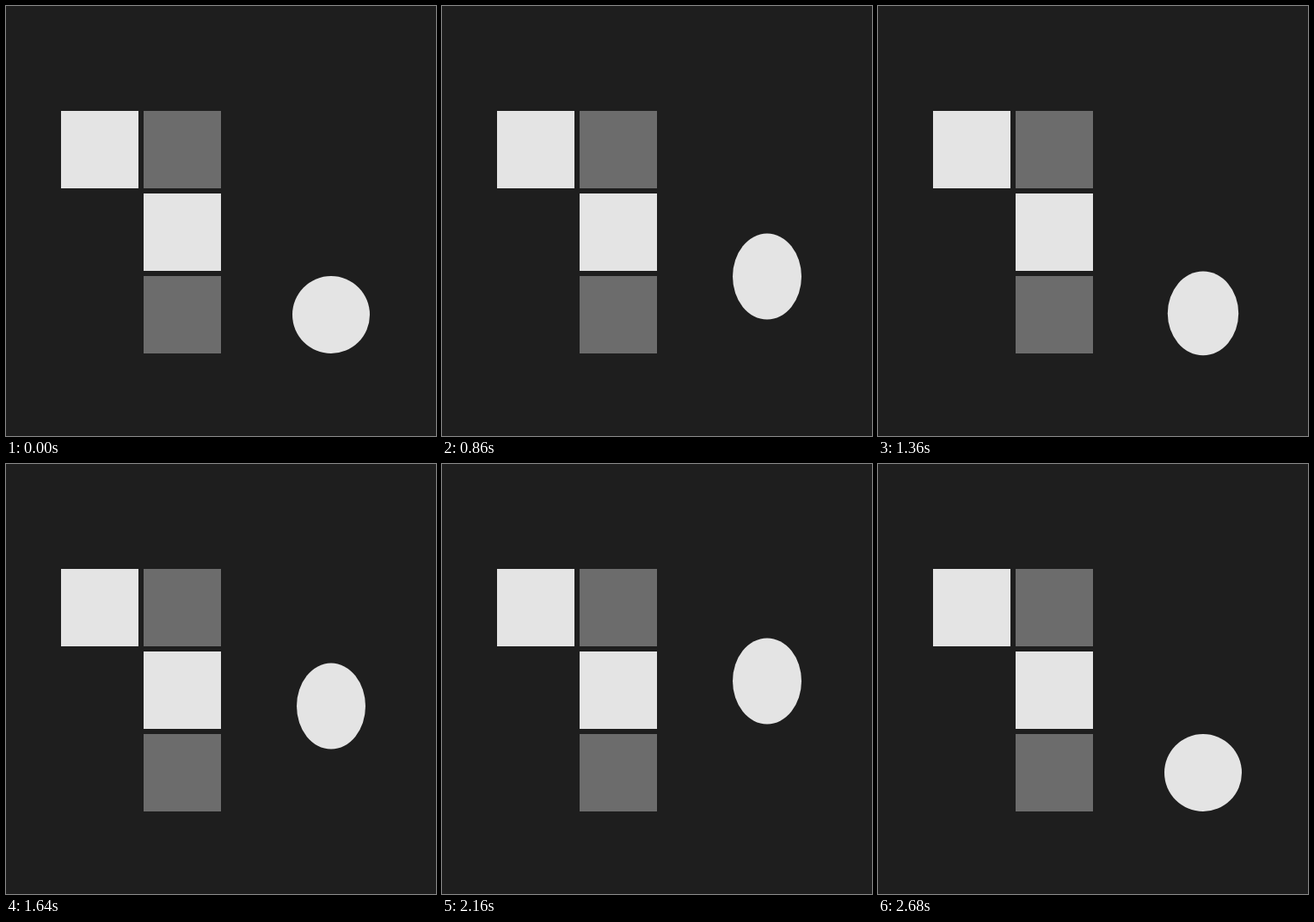
Animation of 500 by 500 pixels, one loop 3.26 s. Source, as an HTML page:

```html
<!DOCTYPE html>
<html lang="en">
<head>
<meta charset="utf-8">
<title>Bouncing ball</title>
<style>
  html, body { margin: 0; width: 100%; height: 100%; overflow: hidden; background: #1e1e1e; }
  svg { display: block; width: 100vw; height: 100vh; }
  .light { fill: #e4e4e4; }
  .grey { fill: #6c6c6c; }
</style>
</head>
<body>
<svg viewBox="0 0 500 500">
  <rect class="light" x="64" y="122" width="90" height="90"/>
  <rect class="grey" x="160" y="122" width="90" height="90"/>
  <rect class="light" x="160" y="218" width="90" height="90"/>
  <rect class="grey" x="160" y="314" width="90" height="90"/>
  <ellipse id="ball" class="light" cx="378" cy="359" rx="45" ry="45"/>
</svg>
<script>
const LOOP = 3260, STEP = 20, TICK = 1000 / 24;
const REST_Y = 359, RADIUS = 45, FLEX = 5;
const HOP = 16, CONTACT = 4, APEX = 8;

// Times in ticks; stretch is how long the ball takes to lengthen at take-off.
const hops = [
  { start: 10, height: 64, stretch: 3 },
  { start: 30, height: 79, stretch: 3 },
  { start: 46, height: 134, stretch: 3.5 }
];
// On the ground: [tick, flex], from -1 (squashed) to 0 (round).
const ground = [[0, 0], [8, 0], [10, -1], [26, -1], [28, 0], [30, -1], [62, -1], [64, 0], [80, 0]];

const clamp = v => Math.min(1, Math.max(0, v));

function groundFlex(t) {
  const i = ground.findIndex(k => t < k[0]);
  const [t0, a] = ground[i - 1], [t1, b] = ground[i];
  return a + (b - a) * (t - t0) / (t1 - t0);
}

function pose(t) {
  const hop = hops.find(h => t >= h.start && t < h.start + HOP);
  if (!hop) {
    const flex = groundFlex(t);
    return { flex, y: REST_Y - FLEX * flex };
  }
  const u = t - hop.start;
  const landing = clamp((HOP - u) / CONTACT);
  const flex = 2 * (u < APEX ? clamp(u / hop.stretch) : landing) - 1;
  const push = 2 * Math.min(clamp(u / CONTACT), landing) - 1;
  const fall = clamp(Math.abs(u - APEX) / (APEX - CONTACT));
  const rise = hop.height * (1 - Math.pow(fall, 2.3));
  return { flex, y: REST_Y - FLEX * push - rise };
}

const ball = document.getElementById("ball");

function draw(now) {
  const ms = Math.floor((now % LOOP) / STEP) * STEP;
  const { flex, y } = pose(ms / TICK);
  ball.setAttribute("cy", y);
  ball.setAttribute("rx", RADIUS - FLEX * flex);
  ball.setAttribute("ry", RADIUS + FLEX * flex);
}

const begin = performance.now();
function loop() {
  draw(performance.now() - begin);
  requestAnimationFrame(loop);
}
loop();
</script>
</body>
</html>
```
